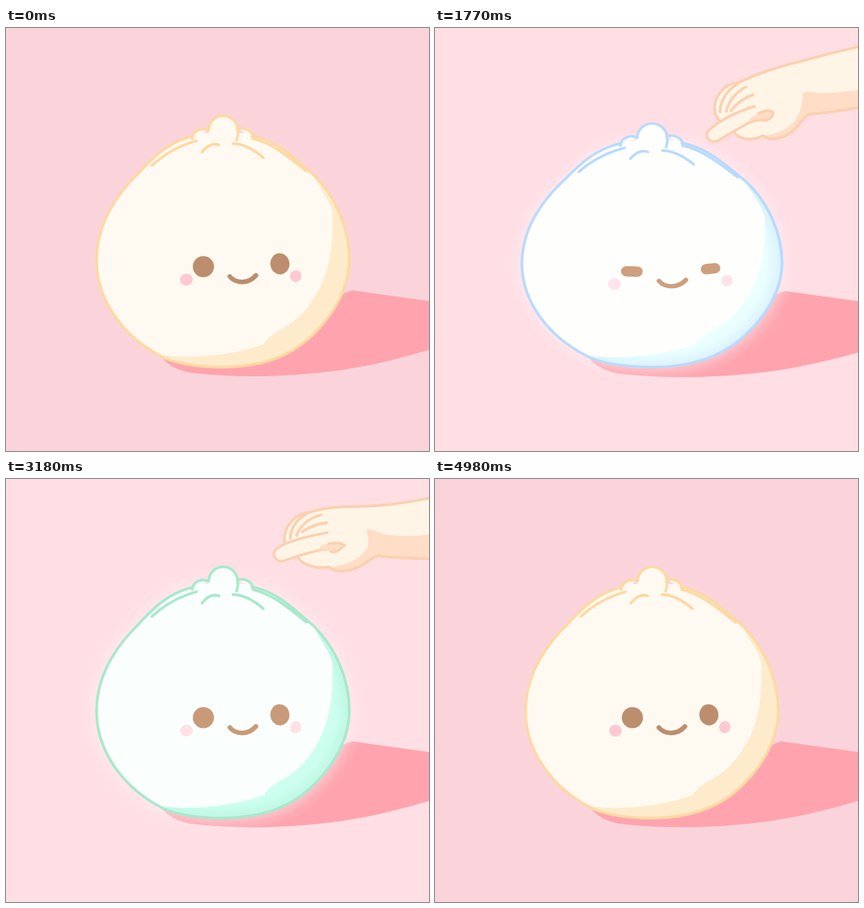
An HTML page for the animation above (5.4 s loop, 600x600 px).

```html
<!DOCTYPE html>
<html lang="en">
<head>
<meta charset="utf-8">
<title>Bun lamp</title>
<style>
@property --s { syntax: "<number>"; inherits: true; initial-value: 0; }
@property --glow { syntax: "<number>"; inherits: true; initial-value: 0; }
@property --bg { syntax: "<color>"; inherits: true; initial-value: #fad4da; }
@property --body { syntax: "<color>"; inherits: true; initial-value: #fffaf1; }
@property --shade { syntax: "<color>"; inherits: true; initial-value: #feebcb; }
@property --line { syntax: "<color>"; inherits: true; initial-value: #fdd9a3; }
@property --eye { syntax: "<color>"; inherits: true; initial-value: #bc8e6e; }
@property --cheek { syntax: "<color>"; inherits: true; initial-value: #ffc8d2; }

html, body { margin: 0; width: 100%; height: 100%; overflow: hidden; }
svg {
  display: block; width: 100vw; height: 100vh; background: var(--bg);
  animation: light 5.4s linear infinite, squash 5.4s ease-in-out infinite;
}

/* bun */
.floor {
  fill: #ffa4ae; transform-origin: 308px 482px;
  transform: translateY(calc(var(--s) * 2px)) scaleX(calc(1 + .047 * var(--s)));
}
.bun {
  transform-origin: 308px 482px;
  transform: scale(calc(1 + .047 * var(--s)), calc(1 - .05 * var(--s)));
}
.halo { fill: #fff4f7; stroke: #fff4f7; stroke-width: 16; filter: blur(9px); opacity: calc(var(--glow) * .55); }
.body { fill: var(--body); }
.shade { fill: var(--shade); }
.rim { fill: none; stroke: var(--line); stroke-width: 22; filter: blur(7px); opacity: calc(var(--glow) * .4); }
.line { fill: none; stroke: var(--line); stroke-width: 3.8; stroke-linecap: round; stroke-linejoin: round; }
.bump { fill: var(--body); stroke: var(--line); stroke-width: 3.8; stroke-linecap: round; }

/* face */
.face { transform: translateY(calc(var(--s) * 4px)); }
.eye {
  --h: calc(30px - 24px * var(--s));
  fill: var(--eye); height: var(--h); y: calc(var(--h) / -2); rx: calc(var(--h) / 2); ry: calc(var(--h) / 2);
}
.cheek { fill: var(--cheek); }
.mouth { fill: none; stroke: var(--eye); stroke-width: 6.5; stroke-linecap: round; }

/* hand */
.hand { animation: reach 5.4s infinite; }
.hand path {
  d: var(--up); animation: poke 5.4s ease-in-out infinite;
  fill: none; stroke: #fbd0b0; stroke-width: 3.8; stroke-linecap: round; stroke-linejoin: round;
}
.hand .skin { fill: #fff5e6; }
.hand .tone { fill: #ffddc7; stroke: none; }

@keyframes reach {
  0%, 4.444% { transform: translate(240px, -70px); animation-timing-function: ease-out; }
  10%, 86.111% { transform: none; animation-timing-function: ease-in; }
  92.222%, 100% { transform: translate(240px, -70px); }
}
@keyframes poke {
  0%, 9.444%, 19.722%, 25.556%, 36.111%, 42.222%, 52.778%, 58.889%, 69.444%, 75.556%, 86.111%, 100% { d: var(--up); }
  14.444%, 30.278%, 46.944%, 63.611%, 80.278% { d: var(--down); }
}
@keyframes squash {
  0%, 12.222%, 19.722%, 28.056%, 36.111%, 44.722%, 52.778%, 61.389%, 69.444%, 78.056%, 86.111%, 100% { --s: 0; }
  14.444%, 30.278%, 46.944%, 63.611%, 80.278% { --s: 1; }
}
@keyframes light {
  0%, 12.222%, 86.111%, 100% {
    --glow: 0; --bg: #fad4da; --body: #fffaf1; --shade: #feebcb;
    --line: #fdd9a3; --eye: #bc8e6e; --cheek: #ffc8d2;
  }
  14.444%, 25.55% {
    --glow: .75; --bg: #ffdbe0; --body: #fffffb; --shade: #ffffe2;
    --line: #ffe8b2; --eye: #ce9f7c; --cheek: #ffdfe5;
  }
  25.556%, 42.215% {
    --glow: .85; --bg: #ffdee4; --body: #fefffc; --shade: #ebffff;
    --line: #b9dafd; --eye: #ce9f7e; --cheek: #ffe3ea;
  }
  42.222%, 58.88% {
    --glow: .85; --bg: #ffdfe4; --body: #fefffb; --shade: #e6d3ff;
    --line: #c1aef0; --eye: #ce9f7e; --cheek: #ffe3ea;
  }
  58.889%, 75.55% {
    --glow: .85; --bg: #ffdfe4; --body: #fafffe; --shade: #cdfff0;
    --line: #a9e8cc; --eye: #c99a79; --cheek: #ffe1e6;
  }
  75.556%, 80.278% {
    --glow: .85; --bg: #ffdfe4; --body: #fffcfd; --shade: #ffdfe4;
    --line: #ffbfc8; --eye: #ce9f7e; --cheek: #ffdde6;
  }
  83.333% {
    --glow: .3; --bg: #fad5dc; --body: #fffafc; --shade: #f9e3da;
    --line: #fad0c4; --eye: #c99873; --cheek: #ffd2df;
  }
}
</style>
</head>
<body>
<svg viewBox="0 0 600 600">
  <defs>
    <path id="shell" d="M128.500 328C129 290 145 248 188 206C206 186 231 160 268 153L349 153C384 160 407 183 437 209C468 240 487 285 487 328C487 380 452 420 430 440C400 467 360 481 308 481C265 481 232 474 215 463C165 435 128 385 128.500 328Z"/>
    <path id="side" d="M437 209C443 226 460 244 463 262C464 300 461 330 450 358C438 386 422 408 398 423C384 431 372 437 366 448C330 462 270 471 218 464C232 474 265 481 308 481C360 481 400 467 430 440C452 420 487 380 487 328C487 285 468 240 437 209Z"/>
    <clipPath id="inside"><use href="#side"/></clipPath>
  </defs>

  <path class="floor" d="M222 468C232 481 250 487 262 489C330 497 400 495 470 486C520 479 560 469 640 445L640 393L491 372L470 380L300 440Z"/>

  <g class="bun">
    <use class="halo" href="#shell"/>
    <use class="body" href="#shell"/>
    <use class="shade" href="#side"/>
    <g clip-path="url(#inside)"><use class="rim" href="#shell"/></g>
    <use class="line" href="#shell"/>
    <path class="body" d="M266 159L274 149H343L351 159L340 170H280Z"/>
    <path class="bump" d="M264 157C265 147 275 140 287 145"/>
    <path class="bump" d="M329 143C340 140 350 147 350 155"/>
    <circle class="body" cx="308" cy="145" r="21"/>
    <path class="line" d="M287.500 145A20.500 20.500 0 0 1 328.500 145Q330 152 327 159"/>
    <path class="line" d="M207 195Q234 170 270 160M278 176Q290 161 302 166M322 164Q342 164 365 184M350 157C378 163 402 184 426 203"/>
    <g class="face">
      <g transform="translate(280 338.500) rotate(2)"><rect class="eye" x="-15" width="30"/></g>
      <g transform="translate(388.500 334.500) rotate(-7)"><rect class="eye" x="-13.500" width="27"/></g>
      <ellipse class="cheek" cx="256" cy="357" rx="9" ry="8.500"/>
      <ellipse class="cheek" cx="411" cy="352" rx="8" ry="8.500" transform="rotate(25 411 352)"/>
      <path class="mouth" d="M317.500 352.500C326 363 344 363 354.500 351"/>
    </g>
  </g>

  <g class="hand">
    <path class="skin" style="
      --up:path('M610 25C560 36 530 38 500 39C470 39 445 42 432 47C410 49 394 66 395 88C398 100 405 106 413 108C416 120 436 128 458 125C470 135 492 130 505 122C513 118 518 111 528 109C555 112 580 113 610 113');
      --down:path('M610 24C570 33 550 42 520 55C490 67 458 82 430 96C410 98 394 118 398 138C403 152 415 165 430 168C434 180 454 183 470 170C480 178 500 172 510 160C519 152 521 140 531 131C555 124 580 120 610 109')"/>
    <path class="tone" style="
      --up:path('M610 78C580 81 555 82 535 78C525 75 515 68 511 73C513 80 516 88 512 98C506 112 480 124 459 125C470 135 492 130 505 122C513 118 518 111 528 109C555 112 580 113 610 113Z');
      --down:path('M610 91C590 96 570 99 552 101C540 102 530 101 527 106C528 116 522 130 516 142C508 158 490 168 471 170C480 178 500 172 510 160C519 152 521 140 531 131C555 124 580 120 610 109Z')"/>
    <path style="
      --up:path('M528 109C518 111 513 118 505 122C492 130 470 135 458 125M528 109C555 112 580 113 610 113');
      --down:path('M531 131C521 140 519 152 510 160C500 172 480 178 470 170M531 131C555 124 580 120 610 109')"/>
    <path style="
      --up:path('M403 84C404 70 412 57 426 50M412 80C418 66 430 55 447 51M420 75C430 68 440 64 455 62');
      --down:path('M405 141C405 123 416 107 431 98M414 142C416 127 425 113 437 104M420 143C427 131 437 121 449 115')"/>
    <path class="skin" style="
      --up:path('M456 76C430 81 402 87 385 98C375 105 382 119 394 116C408 111 424 106 440 102C452 98 458 100 466 103');
      --down:path('M452 133C428 142 406 158 391 174C383 183 395 193 406 187C417 178 430 168 444 157C455 148 465 150 472 148')"/>
    <path class="tone" style="
      --up:path('M448 94C458 92 470 85 480 94C476 99 470 107 462 103C456 100 450 100 440 102Z');
      --down:path('M452 144C460 142 468 130 479 135C485 142 476 150 466 147C460 146 452 149 445 154Z')"/>
    <path style="
      --up:path('M458 92C467 91 473 89 480 94C474 99 469 106 461 103');
      --down:path('M460 139C466 134 474 131 480 136C483 144 474 149 466 147')"/>
  </g>
</svg>
</body>
</html>
```
